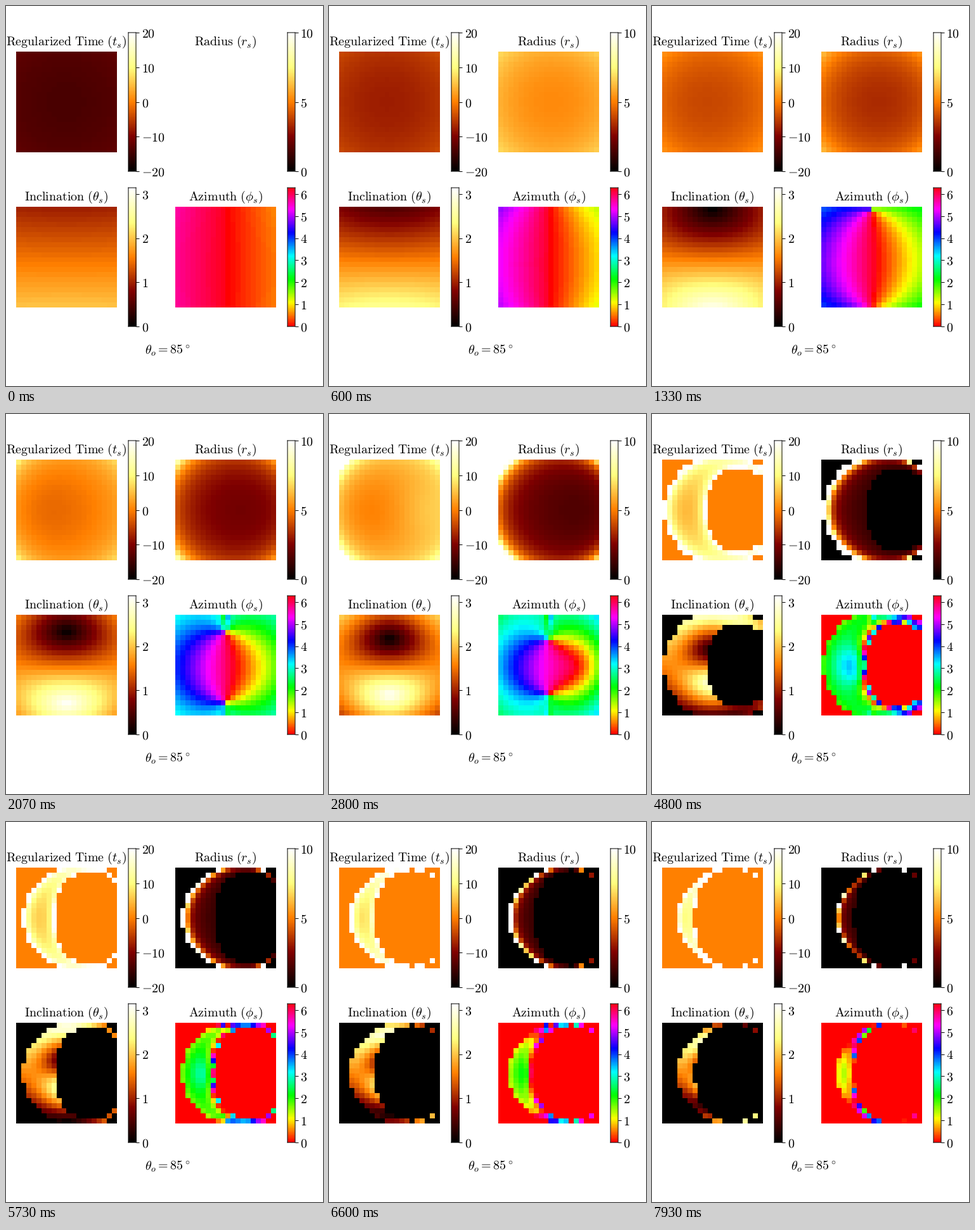
Animation, 500 px wide and 600 px high, one loop 8 s. Source, as a matplotlib script:

```python
import numpy as np
import matplotlib.pyplot as plt
from matplotlib.animation import FuncAnimation

W, H, DPI = 500, 600, 100
FRAMES, LOOP = 120, 8000
PX = 72 / DPI                        # one pixel in points

# Kerr black hole seen from infinity, in units of its mass
SPIN = 0.99
INCL = np.radians(85)
HORIZON = 1 + np.sqrt(1 - SPIN**2)
GRID, SCREEN = 20, 5.0
TAU0, TAU_START, TAU_STEP = 1e-3, 0.1, 2.9 / 288   # Mino time

plt.rcParams["mathtext.fontset"] = "cm"
plt.rcParams["text.hinting"] = "none"

side = np.linspace(-SCREEN, SCREEN, GRID)
alpha, beta = np.meshgrid(side, side)
lam = -alpha * np.sin(INCL)
eta = beta**2 + (alpha**2 - SPIN**2) * np.cos(INCL)**2
A = SPIN**2 - lam**2 - eta
B = eta + (lam - SPIN)**2


def slope(state):
    """Mino-time derivatives of u = 1/r, c = cos(theta), time and azimuth."""
    u, du, c, dc, _, _ = state
    delta = 1 - 2 * u + (SPIN * u)**2          # Delta / r^2
    sin2 = 1 - c**2
    ddu = A * u + 3 * B * u**2 - 2 * SPIN**2 * eta * u**3
    ddc = A * c - 2 * SPIN**2 * c**3
    a2 = 1 + (SPIN * u)**2
    flow = a2 * (a2 - SPIN * lam * u**2) / (delta * u**2)
    flow += SPIN * (lam - SPIN * sin2)
    dt = flow - du * (1 / u**2 + 2 / u)        # divergent part removed
    dphi = -SPIN * (2 * u - SPIN * lam * u**2) / delta - lam / sin2
    return np.array([du, ddu, dc, ddc, dt, dphi])


def advance(state, alive, span, steps):
    h = span / steps
    for _ in range(steps):
        k1 = slope(state)
        k2 = slope(state + h / 2 * k1)
        k3 = slope(state + h / 2 * k2)
        k4 = slope(state + h * k3)
        state = np.where(alive, state + h / 6 * (k1 + 2 * k2 + 2 * k3 + k4), state)
        alive = alive & (state[0] > 0) & (state[0] < 1 / HORIZON)
    return state, alive


def coordinates(state, alive):
    u, _, c, _, t, phi = state
    r = 1 / u
    maps = (t - r - 2 * np.log(r), r,
            np.arccos(np.clip(c, -1, 1)), phi % (2 * np.pi))
    return [np.where(alive, m, 0) for m in maps]


def trace():
    one = np.ones_like(alpha)
    rise = beta * np.sin(INCL)
    state = np.array([TAU0 * one, one + A * TAU0**2 / 2,
                      np.cos(INCL) + rise * TAU0, rise,
                      0 * one, -lam / np.sin(INCL)**2 * TAU0])
    alive = one > 0
    result = []
    with np.errstate(all="ignore"):
        state, alive = advance(state, alive, TAU_START - TAU0, 120)
        for _ in range(FRAMES):
            result.append(coordinates(state, alive))
            state, alive = advance(state, alive, TAU_STEP, 20)
    return result


fig = plt.figure(figsize=(W / DPI, H / DPI), dpi=DPI, facecolor="white")


def box(x, y, w, h):
    return fig.add_axes([x / W, 1 - (y + h) / H, w / W, h / H])


def label(x, y, text):
    fig.text(x / W, 1 - y / H, text, size=20 * PX, ha="center", va="baseline")


def panel(x, y, title, cmap, low, high, ticks):
    ax = box(x, y, 158.8, 159)
    ax.axis("off")
    image = ax.imshow(np.zeros((GRID, GRID)), cmap=cmap, vmin=low, vmax=high,
                      origin="lower", aspect="auto", interpolation="nearest")
    label(x + 79.5, y - 10, title)

    bar = box(x + 177, y - 30, 12, 219)
    bar.imshow(np.linspace(0, 1, 256)[:, None], cmap=cmap, origin="lower",
               aspect="auto", extent=(0, 1, low, high))
    bar.set_xticks([])
    bar.yaxis.tick_right()
    bar.set_yticks(ticks, [f"${v}$" for v in ticks])
    bar.tick_params(length=5 * PX, width=PX, pad=3.5 * PX, labelsize=20 * PX)
    for spine in bar.spines.values():
        spine.set_linewidth(PX)
        spine.set_snap(False)
    return image


images = [
    panel(16, 72, r"$\mathrm{Regularized\ Time}\ (t_s)$", "afmhot",
          -20, 20, range(-20, 21, 10)),
    panel(267, 72, r"$\mathrm{Radius}\ (r_s)$", "afmhot", 0, 10, (0, 5, 10)),
    panel(16, 317, r"$\mathrm{Inclination}\ (\theta_s)$", "afmhot",
          0, np.pi, range(4)),
    panel(267, 317, r"$\mathrm{Azimuth}\ (\phi_s)$", "hsv",
          0, 2 * np.pi, range(7)),
]
label(255, 548, r"$\theta_o=85^\circ$")

history = trace()


def draw(i):
    for image, data in zip(images, history[i]):
        image.set_data(data)
    return images


anim = FuncAnimation(fig, draw, frames=FRAMES, interval=LOOP / FRAMES,
                     init_func=lambda: draw(0), repeat=True, repeat_delay=0)
plt.show()
```
